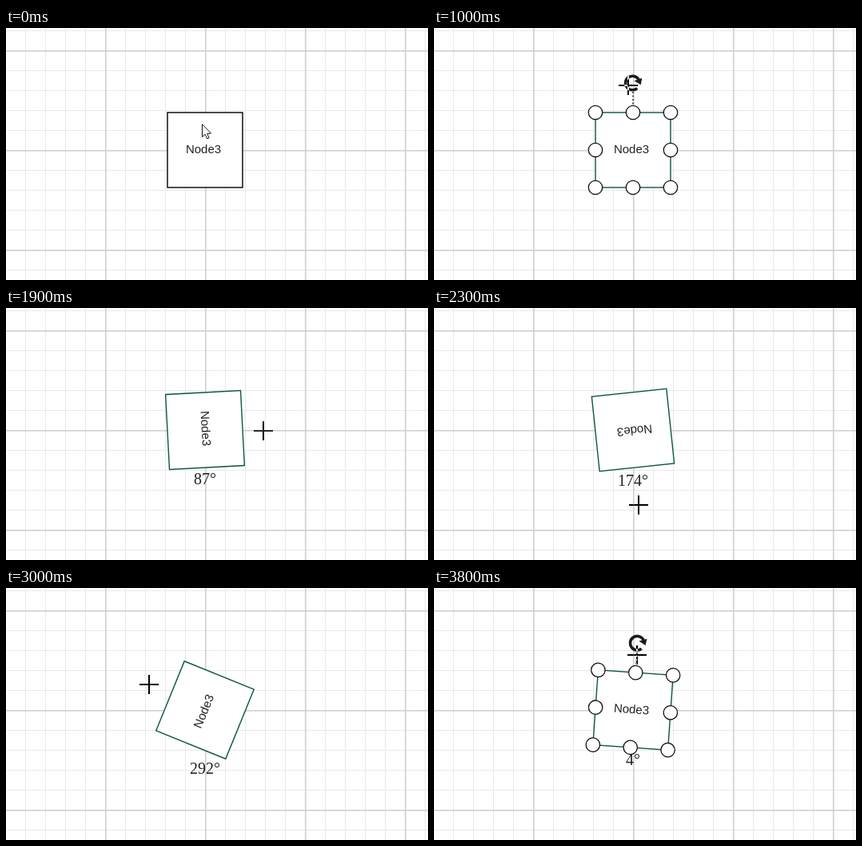
Animation, 528 px wide and 316 px high, one loop 4000 ms. Source, as an HTML page with a canvas:

```html
<!DOCTYPE html>
<html lang="en">
<head>
<meta charset="utf-8">
<title>Rotating a node</title>
<style>
  html, body { margin: 0; width: 100%; height: 100%; overflow: hidden; background: #fff; }
  canvas { display: block; }
</style>
</head>
<body>
<canvas id="stage" width="528" height="316"></canvas>
<script>
const W = 528, H = 316, LOOP = 4000, STEP = 100;
const SELECT = 500, GRAB = 1400, RELEASE = 3800;
const CX = 249, CY = 153, HALF = 47;
const RAD = Math.PI / 180;
const ctx = document.getElementById('stage').getContext('2d');

// Poses of the gesture: the pointer circles the node and the node follows.
const POSES = [
  { t: 500, turn: 0, aim: -5.4, reach: 32 },
  { t: 1000, turn: 0, aim: -4.2, reach: 81 },
  { t: 1400, turn: 0, aim: -4.2, reach: 81 },
  { t: 1900, turn: 87, aim: 90.8, reach: 73 },
  { t: 2300, turn: 174, aim: 175.7, reach: 94.3 },
  { t: 2700, turn: 253, aim: 254.3, reach: 88.3 },
  { t: 3300, turn: 327, aim: 329.3, reach: 68.6 },
  { t: 3600, turn: 364, aim: 364.1, reach: 69.2 }
];

function slope(i, key) {
  const a = POSES[i], b = POSES[i + 1];
  return a && b ? (b[key] - a[key]) / (b.t - a.t) : 0;
}

// Harmonic mean of the neighbouring slopes keeps the curve from overshooting.
function tangent(i, key) {
  const before = slope(i - 1, key), after = slope(i, key);
  return before * after > 0 ? 2 * before * after / (before + after) : 0;
}

function ease(key, time) {
  const t = Math.min(Math.max(time, POSES[0].t), POSES[POSES.length - 1].t);
  const i = Math.max(0, POSES.findIndex(p => p.t >= t) - 1);
  const a = POSES[i], b = POSES[i + 1];
  const span = b.t - a.t, s = (t - a.t) / span;
  return a[key] + (b[key] - a[key]) * s * s * (3 - 2 * s)
    + span * s * (1 - s) * (tangent(i, key) * (1 - s) - tangent(i + 1, key) * s);
}

function poly(points) {
  ctx.beginPath();
  points.forEach(([x, y]) => ctx.lineTo(x, y));
  ctx.closePath();
}

function gridLines(gap, size, color) {
  ctx.fillStyle = color;
  for (let x = 124 % gap; x < W; x += gap) ctx.fillRect(x, 0, size, H);
  for (let y = 28 % gap; y < H; y += gap) ctx.fillRect(0, y, W, size);
}

function drawNode(selected) {
  ctx.fillStyle = '#fff';
  ctx.fillRect(-HALF, -HALF, 2 * HALF, 2 * HALF);
  ctx.strokeStyle = selected ? '#0c5646' : '#000';
  ctx.lineWidth = 1.4;
  ctx.strokeRect(-HALF, -HALF, 2 * HALF, 2 * HALF);
  ctx.fillStyle = '#222';
  ctx.font = '15px "Liberation Sans", Arial, sans-serif';
  ctx.fillText('Node3', -2, 4.2);
}

function drawRotator() {
  ctx.strokeStyle = ctx.fillStyle = '#1a1a1a';
  ctx.lineWidth = 1.4;
  ctx.setLineDash([2, 2.5]);
  ctx.beginPath();
  ctx.moveTo(0, -73);
  ctx.lineTo(0, -56);
  ctx.stroke();
  ctx.setLineDash([]);

  ctx.save();
  ctx.translate(0, -84);
  ctx.lineWidth = 3.6;
  ctx.beginPath();
  ctx.arc(-0.6, 0, 8.8, 48 * RAD, 332 * RAD);
  ctx.stroke();
  poly([[9.8, 2.2], [11.2, -6.3], [1.5, -2.7]]);
  ctx.fill();
  ctx.restore();
}

function drawHandles() {
  drawRotator();
  ctx.fillStyle = '#fff';
  ctx.strokeStyle = '#111';
  ctx.lineWidth = 1.3;
  for (const i of [-1, 0, 1]) {
    for (const j of [-1, 0, 1]) {
      if (!i && !j) continue;
      ctx.beginPath();
      ctx.arc(i * HALF, j * HALF, 8.7, 0, 2 * Math.PI);
      ctx.fill();
      ctx.stroke();
    }
  }
}

function drawLabel(turn) {
  const a = turn * RAD;
  const bottom = CY + HALF * (Math.abs(Math.cos(a)) + Math.abs(Math.sin(a)));
  ctx.fillStyle = '#222';
  ctx.font = '20px "Liberation Serif", "Times New Roman", serif';
  ctx.fillText(Math.round(turn) % 360 + '°', CX, bottom + 18.6);
}

function drawArrow(x, y) {
  ctx.save();
  ctx.translate(x - 0.5, y - 0.5);
  poly([[0, 0], [0, 16], [3.7, 12.6], [6.2, 18.2], [8.6, 17.2], [6.2, 11.7], [11, 11.5]]);
  ctx.fillStyle = '#fff';
  ctx.strokeStyle = '#111';
  ctx.lineWidth = 1;
  ctx.fill();
  ctx.stroke();
  ctx.restore();
}

// The cross inverts whatever lies below it.
function drawCross(x, y) {
  ctx.save();
  ctx.translate(Math.round(x), Math.round(y));
  ctx.globalCompositeOperation = 'difference';
  ctx.fillStyle = '#fff';
  ctx.fillRect(-12, -1, 24, 2);
  ctx.fillRect(-1, -12, 2, 11);
  ctx.fillRect(-1, 1, 2, 11);
  ctx.restore();
}

function draw(time) {
  const t = Math.floor(time / STEP) * STEP;
  const selected = t >= SELECT;
  const grabbed = t >= GRAB;
  const dragging = grabbed && t < RELEASE;
  const turn = ease('turn', t);
  const aim = ease('aim', t) * RAD;
  const reach = ease('reach', t);

  ctx.fillStyle = '#fff';
  ctx.fillRect(0, 0, W, H);
  gridLines(25, 1, '#e9e9e9');
  gridLines(125, 1.6, '#d0d0d0');

  const inNode = paint => {
    ctx.save();
    ctx.translate(CX, CY);
    ctx.rotate(turn * RAD);
    paint();
    ctx.restore();
  };
  ctx.textAlign = 'center';
  inNode(() => drawNode(selected));
  if (grabbed) drawLabel(turn);
  if (selected && !dragging) inNode(drawHandles);

  const overRotator = grabbed || reach > 70;
  const drawPointer = overRotator ? drawCross : drawArrow;
  drawPointer(CX + reach * Math.sin(aim), CY - reach * Math.cos(aim));
}

const start = performance.now();
function tick() {
  draw((performance.now() - start) % LOOP);
  requestAnimationFrame(tick);
}
tick();
</script>
</body>
</html>
```
